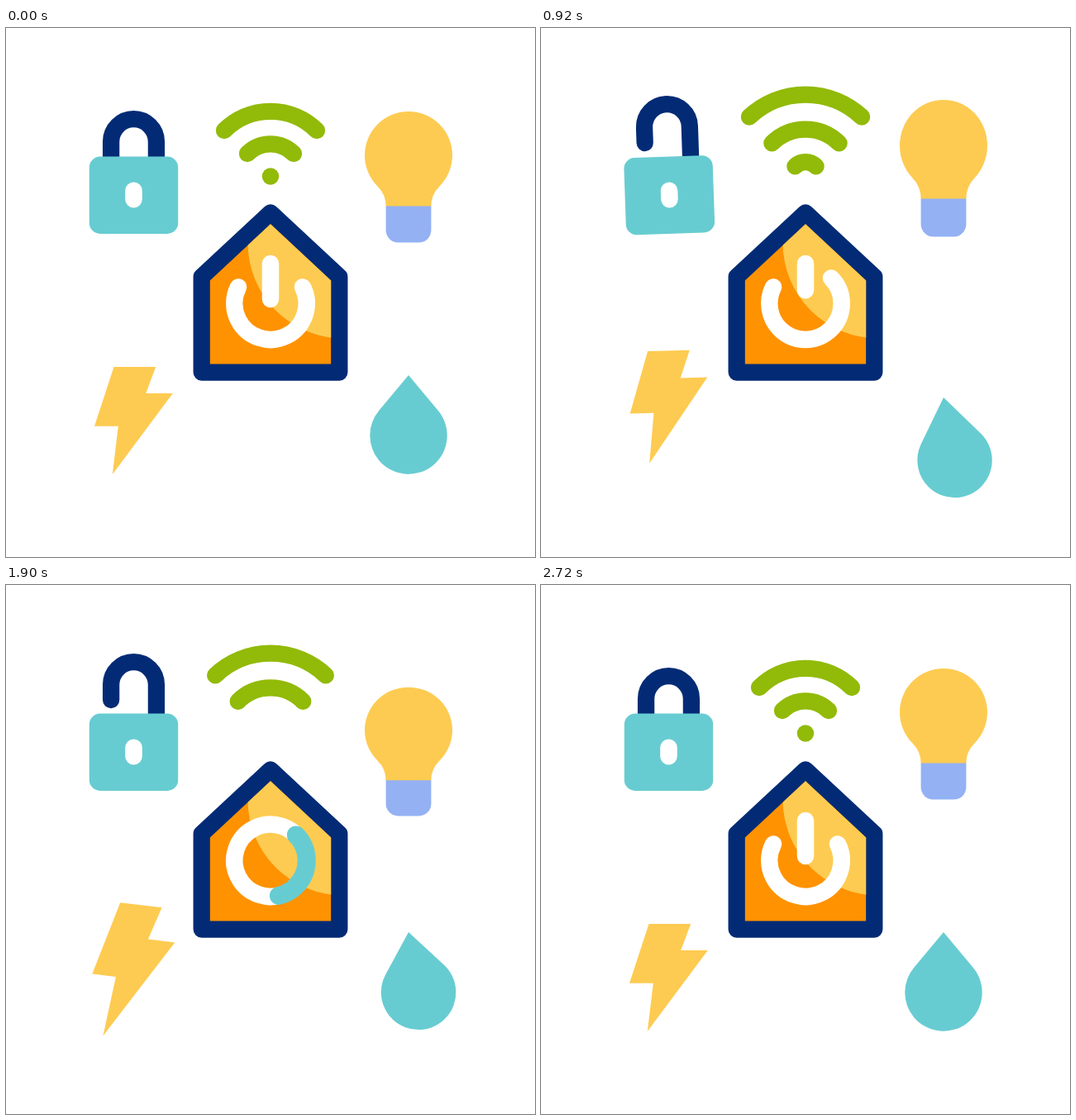
An HTML page with a canvas that plays this animation: 640 px wide and 640 px high, repeating every 3 s.

```html
<!DOCTYPE html>
<html lang="en">
<head>
<meta charset="utf-8">
<title>Smart home</title>
<style>
  html, body { margin: 0; width: 100%; height: 100%; overflow: hidden; background: #fff; }
  canvas { display: block; width: 640px; height: 640px; }
</style>
</head>
<body>
<canvas id="stage" width="640" height="640"></canvas>
<script>
const ctx = document.getElementById('stage').getContext('2d');
const LOOP = 3000, STEP = 20, RAD = Math.PI / 180;
const NAVY = '#032b75', TEAL = '#67ccd1', GREEN = '#92ba08',
      YELLOW = '#fdcb51', ORANGE = '#ff9200', BLUE = '#94b1f4', WHITE = '#fff';

// Cosine ease from 0 to 1 between two times.
function ease(t, from, to) {
  const u = Math.min(1, Math.max(0, (t - from) / (to - from)));
  return (1 - Math.cos(Math.PI * u)) / 2;
}

// Eased swing through a few [time, value] turning points.
function swing(t, ...turns) {
  return turns.reduce((v, [time, value], i) =>
    i ? v + (value - turns[i - 1][1]) * ease(t, turns[i - 1][0], time) : value, 0);
}

function fill(color) {
  ctx.fillStyle = color;
  ctx.fill();
}

function stroke(color, width) {
  ctx.strokeStyle = color;
  ctx.lineWidth = width;
  ctx.lineCap = ctx.lineJoin = 'round';
  ctx.stroke();
}

function polygon(...points) {
  ctx.beginPath();
  points.forEach(p => ctx.lineTo(...p));
  ctx.closePath();
}

function roundRect(x, y, w, h, radii) {
  ctx.beginPath();
  ctx.roundRect(x, y, w, h, radii);
}

function disc(x, y, r) {
  ctx.beginPath();
  ctx.arc(x, y, r, 0, 2 * Math.PI);
}

// Angles in degrees, clockwise from the top.
function arc(x, y, r, from, to, color, width) {
  ctx.beginPath();
  ctx.arc(x, y, r, (from - 90) * RAD, (to - 90) * RAD);
  stroke(color, width);
}

function group(draw) {
  ctx.save();
  draw();
  ctx.restore();
}

function place(x, y, tilt = 0, stretch = 1) {
  ctx.translate(x, y);
  ctx.rotate(tilt * RAD);
  ctx.scale(1, stretch);
}

// Five waves run outwards, each arc moving into the place of the next.
function drawWifi(t) {
  const running = t > 200 && t < 2702;
  const p = running ? (t - 192) / 502 % 1 : 0;
  const wave = (r, half) => arc(320, 180, r, -half, half, GREEN, 20.3);
  wave(79.2 + 45 * p, 45 - 4 * p);
  wave(39.6 * (1 + p), 45);
  if (p > .43) wave(39.6 * p, 45);
  disc(320, 179.5, 10.2 * Math.max(0, 1 - 5 * Math.min(p, 1 - p)));
  fill(GREEN);
}

function drawLock(t) {
  const tilt = swing(t, [200, 0], [440, -7], [700, -8], [1350, 15.5], [1800, 10], [1900, 0]);
  const lift = swing(t, [400, 0], [1400, 34], [2400, 0]);
  place(154.5, 180, tilt);
  const y = -42.4 - lift, legX = 27.4;
  ctx.beginPath();
  ctx.moveTo(-legX, y + 18.5);
  ctx.arc(0, y, legX, Math.PI, 0);
  ctx.lineTo(legX, 0);
  stroke(NAVY, 20.3);
  roundRect(-53.7, -24.4, 107.4, 93.3, 13);
  fill(TEAL);
  roundRect(-10.3, 6.5, 20.6, 31, 10.3);
  fill(WHITE);
}

function drawBulb(t) {
  const y = 101 + swing(t, [200, 0], [500, 23], [1360, -54], [1950, 24], [2300, 0]);
  const stretch = swing(t, [200, 1], [500, .975], [1050, 1.055], [1500, 1.055], [1950, .98], [2300, 1]);
  place(487, y, 0, stretch);
  roundRect(-27.4, 114, 54.8, 44.6, [0, 0, 15, 15]);
  fill(BLUE);
  ctx.beginPath();
  ctx.arc(0, 53, 53, 135 * RAD, 45 * RAD);
  ctx.quadraticCurveTo(27.4, 100.5, 27.4, 114.6);
  ctx.lineTo(-27.4, 114.6);
  ctx.quadraticCurveTo(-27.4, 100.5, -37.5, 90.5);
  fill(YELLOW);
}

function drawBolt(t) {
  const y = 475 + swing(t, [200, 0], [450, -16], [900, -17], [1390, 42], [2050, -14], [2700, 0]);
  const tilt = swing(t, [600, 0], [1400, -4.6], [1950, 7], [2300, 0]);
  const stretch = swing(t, [200, 1], [480, .89], [1450, 1.25], [1900, 1.25], [2300, 1]);
  place(154.5 - .3 * tilt, y, tilt, stretch);
  polygon([-24, -65], [26.7, -65], [14.7, -33], [47.3, -33], [-25.7, 65], [-18.7, 6.7], [-47.5, 6.7]);
  fill(YELLOW);
}

function drawDrop(t) {
  const y = 420 + swing(t, [200, 0], [820, 28], [1600, 0]);
  const tilt = swing(t, [200, 0], [760, -13], [1420, 8], [1980, -10.3], [2600, 0]);
  const length = swing(t, [200, 73], [820, 78], [1450, 66], [1950, 74], [2700, 73]);
  const r = 46.7 - .15 * Math.abs(tilt), half = Math.asin(r / length);
  place(487, y, tilt);
  ctx.beginPath();
  ctx.moveTo(0, 0);
  ctx.arc(0, length, r, -half, Math.PI + half);
  ctx.closePath();
  fill(TEAL);
}

function drawHouse() {
  polygon([320, 223.3], [403.3, 301], [403.3, 416.6], [236.7, 416.6], [236.7, 301]);
  fill(ORANGE);
  stroke(NAVY, 20.3);
  polygon([320, 237.2], [393.2, 305.4], [393.2, 406.4], [246.8, 406.4], [246.8, 305.4]);
  group(() => {
    ctx.clip();
    disc(408, 260, 115.5);
    fill(YELLOW);
  });
}

// The button is pressed, closes to a ring while a segment turns, then opens again.
function drawPower(t) {
  const press = swing(t, [200, 0], [460, .135], [740, 0]);
  const r = 43.7 * (1 - press);
  const pin = swing(t, [780, 43], [1200, 0], [2150, 0], [2650, 43]);
  if (pin > 1) {
    ctx.beginPath();
    ctx.moveTo(320, 285 + 56 * press);
    ctx.lineTo(320, 285 + pin);
    stroke(WHITE, 20.5);
  }
  const opening = t > 1700;
  const start = opening ? 63 : swing(t, [800, 63], [1290, -63]);
  const end = opening ? swing(t, [2150, 423], [2580, 297]) : 297;
  arc(320, 333.3, r, start, end, WHITE, 20.5);

  const middle = 21 + .2125 * (t - 1500);
  const half = swing(t, [1180, 0], [1420, 61], [2000, 61], [2240, 0]);
  if (half > 1) arc(320, 333.3, r, middle - half, middle + half, TEAL, 22);
}

function frame(now) {
  const t = Math.floor(now % LOOP / STEP) * STEP;
  ctx.fillStyle = WHITE;
  ctx.fillRect(0, 0, 640, 640);
  [drawWifi, drawLock, drawBulb, drawBolt, drawDrop, drawHouse, drawPower]
    .forEach(draw => group(() => draw(t)));
}

const begin = performance.now();
function tick() {
  frame(performance.now() - begin);
  requestAnimationFrame(tick);
}
tick();
</script>
</body>
</html>
```
